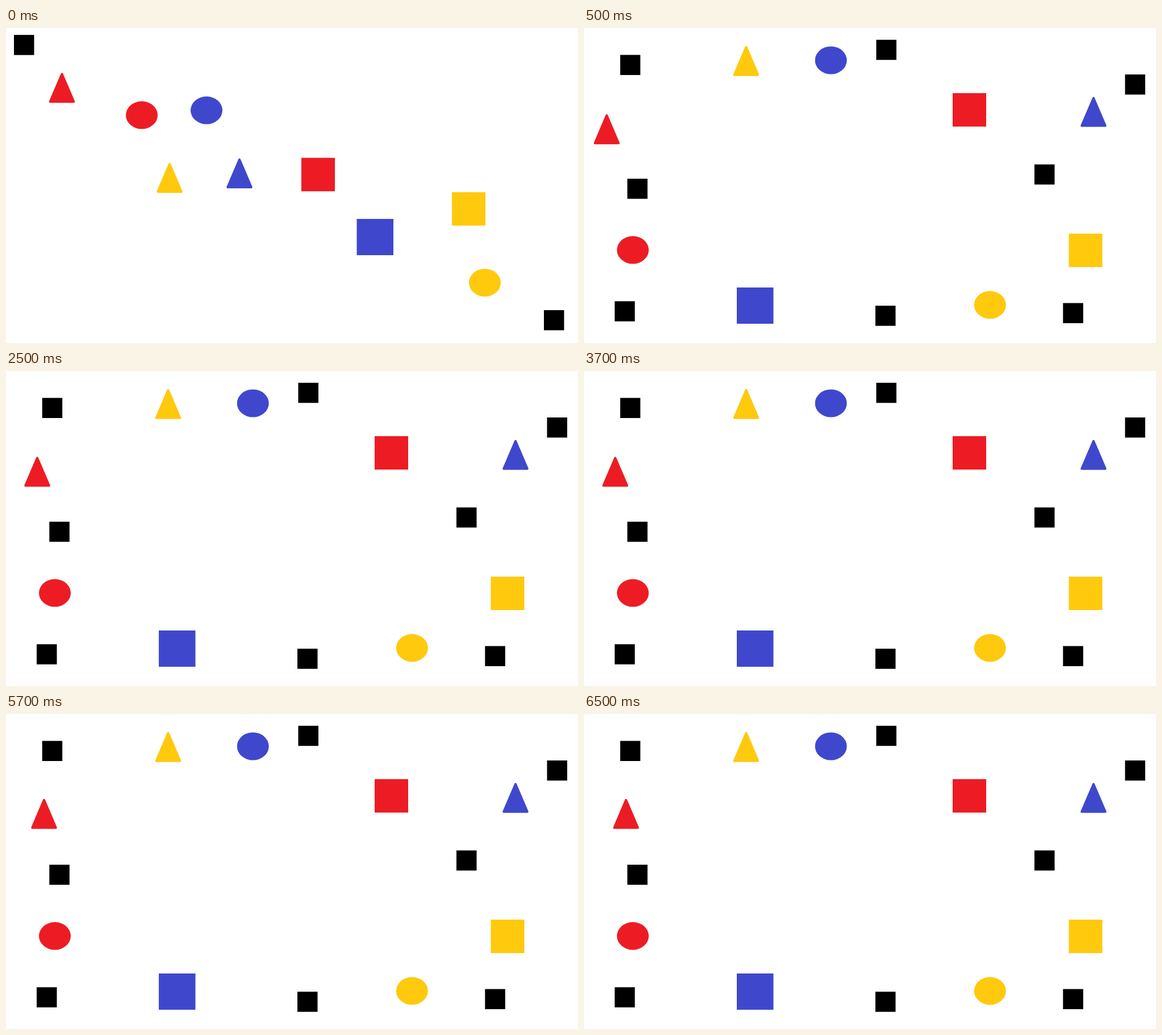
Animation of 1007x556 px, one loop 8000 ms. Source, as an HTML page with a canvas:

```html
<!DOCTYPE html>
<html lang="en">
<head>
<meta charset="utf-8">
<title>Shapes</title>
<style>
  html, body { margin: 0; width: 100%; height: 100%; overflow: hidden; background: #fff; }
  canvas { display: block; }
</style>
</head>
<body>
<canvas id="stage" width="1007" height="556"></canvas>
<script>
const ctx = document.getElementById('stage').getContext('2d');
const RED = '#ed1c24', BLUE = '#3f48cc', YELLOW = '#ffc90e', BLACK = '#000';
const LOOP = 8000, SCATTER = 500, STEP = 2000;

// Every shape is placed by the top left corner of its box.
function square(color, x, y, w = 59, h = w) {
  ctx.fillStyle = color;
  ctx.fillRect(x, y, w, h);
}

function oval(color, x, y) {
  ctx.fillStyle = color;
  ctx.beginPath();
  ctx.ellipse(x + 28, y + 24.5, 28, 24.5, 0, 0, 2 * Math.PI);
  ctx.fill();
}

function triangle(color, x, y) {
  ctx.fillStyle = ctx.strokeStyle = color;
  ctx.lineWidth = 4;
  ctx.lineJoin = 'round';
  ctx.beginPath();
  ctx.moveTo(x + 23, y + 2.2);
  ctx.lineTo(x + 43.8, y + 51);
  ctx.lineTo(x + 2.2, y + 51);
  ctx.closePath();
  ctx.fill();
  ctx.stroke();
}

const blocks = places => places.forEach(([x, y]) => square(BLACK, x, y, 35.5));

function drawStart() {
  blocks([[14, 12.2], [947, 498]]);
  triangle(RED, 75.5, 79);
  triangle(YELLOW, 265, 238);
  triangle(BLUE, 388, 230);
  oval(RED, 211, 129.3);
  oval(BLUE, 325, 120.8);
  oval(YELLOW, 815, 425);
  square(RED, 520, 229.2);
  square(YELLOW, 785, 289.8);
  square(BLUE, 617.5, 337, 64.5, 64);
}

function drawScattered(walker) {
  blocks([[63.7, 47.5], [514.5, 20.8], [952.5, 82], [793, 240.8],
          [76.3, 266], [54, 482.3], [513, 490.2], [843.3, 485.5]]);
  triangle(RED, ...walker);
  triangle(YELLOW, 262.5, 31.7);
  triangle(BLUE, 874, 121.5);
  oval(RED, 58, 367.3);
  oval(BLUE, 406.7, 32.5);
  oval(YELLOW, 686.8, 464.3);
  square(RED, 649, 115);
  square(YELLOW, 853.5, 363);
  square(BLUE, 269, 458, 64.5, 64);
}

const walk = [[17, 152.2], [32, 151.3], [44, 149.7], [51, 149.7]];

function frame(now) {
  const t = now % LOOP;
  ctx.fillStyle = '#fff';
  ctx.fillRect(0, 0, 1007, 556);
  if (t < SCATTER) drawStart();
  else drawScattered(walk[Math.floor((t - SCATTER) / STEP)]);
  requestAnimationFrame(frame);
}
frame(performance.now());
</script>
</body>
</html>
```
